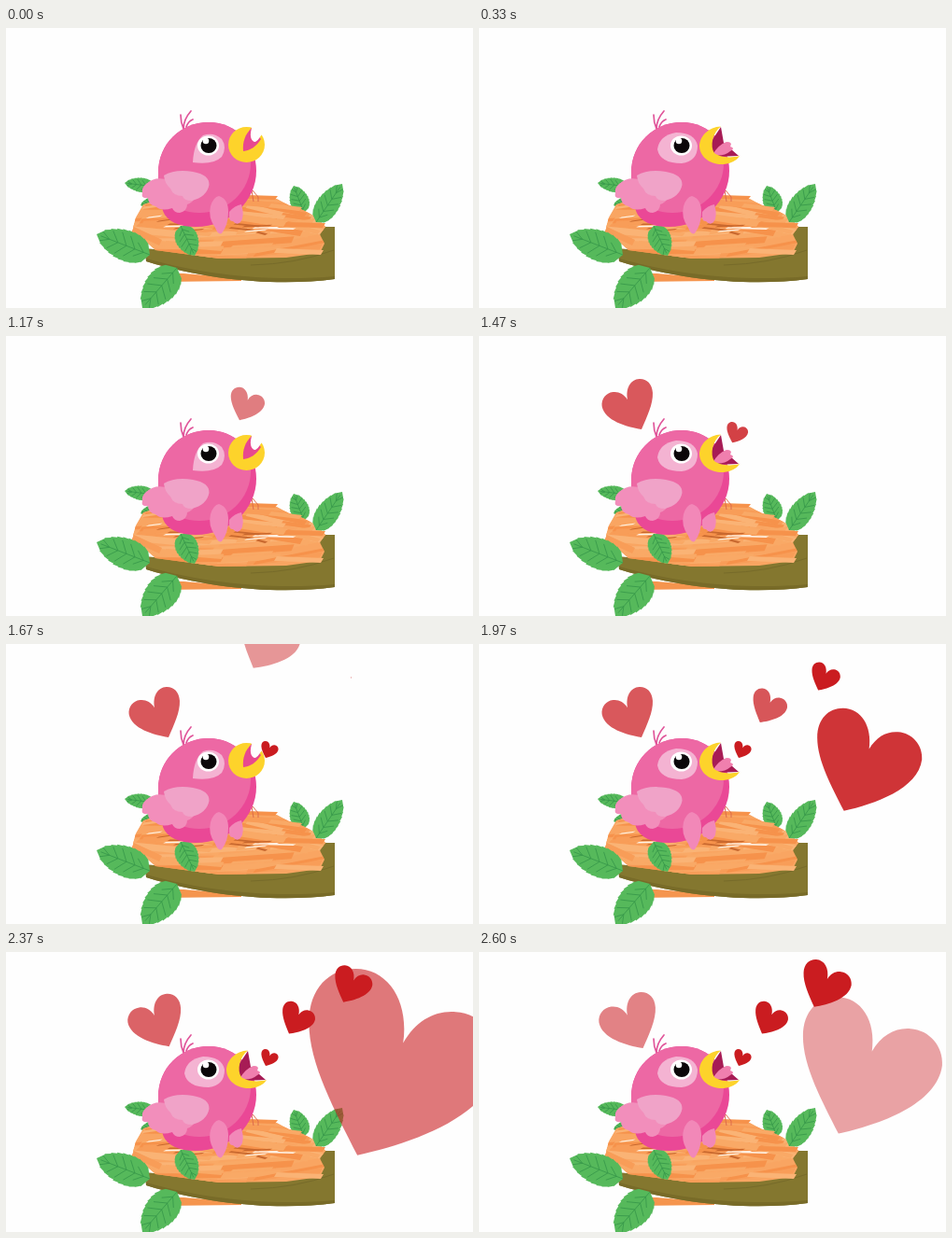
These frames come from a looping animation (500 px wide and 300 px high, 2.63 s). An HTML page:

```html
<!DOCTYPE html>
<html lang="en">
<head>
<meta charset="utf-8">
<title>Bird and hearts</title>
<style>
html, body { margin: 0; width: 100%; height: 100%; overflow: hidden; background: #fefefe; }
svg { display: block; width: 500px; height: 300px; }
</style>
</head>
<body>
<svg viewBox="0 0 500 300">
  <defs>
    <path id="heart" d="M0 0C-13-26-28-53-28-77C-28-97-16-108-1-108C18-108 30-89 26.5-65C34-78 45-84 57-83C72-82 83-69 82-54C78-23 32-7 0 0Z"/>
    <clipPath id="bodyClip"><path d="M217 101C246 101 268 124 268 153C268 185 240 213 203 213C185 213 172 207 168 196C165 182 163 170 163 155C163 124 187 101 217 101Z"/></clipPath>
    <clipPath id="nestClip"><path d="M136 214L139 203L147 189L162 184L262 182L290 183L303 190L318 195L333 203L342 213L336 221L341 231L336 241L300 246L228 247L160 238L150 229Z"/></clipPath>
  </defs>
  <g id="backLeaves"></g>
  <path fill="#f5954e" d="M155 262L190 263L252 268V271L165 272Z"/>
  <path fill="#84772f" d="M148 236C220 244 300 240 335 213H352V269C300 276 225 273 150 250Z"/>
  <path fill="#786b28" d="M150 247C225 268 295 271 352 266V269C300 276 225 273 150 250Z"/>
  <path fill="none" stroke="#776b2a" d="M262 254Q310 253 351 238"/>
  <g id="nest" clip-path="url(#nestClip)"></g>
  <g id="nestEnds"></g>
  <g id="frontLeaves"></g>

  <g fill="none" stroke="#e0559a" stroke-width="1.700" stroke-linecap="round">
    <path d="M190 108Q187 101 187 93M190 108Q190 98 198 89M193 106Q195 100 200 98"/>
  </g>
  <path fill="none" stroke="#dd6a4c" d="M262 168L265 186M264 174L270 181V186"/>
  <g clip-path="url(#bodyClip)">
    <path fill="#ea4896" d="M160 98H272V216H160Z"/>
    <ellipse cx="207" cy="145" rx="55" ry="53" fill="#ed68a4"/>
  </g>
  <path fill="#f28ebb" d="M150 167Q160 158 174 163L206 178Q199 188 194 189Q194 196 186 198Q180 198 178 193Q166 197 160 191Q152 189 152 182Q144 183 146 177Q145 171 150 167Z"/>
  <path fill="#f0a3c8" d="M169 158Q181 151 200 154Q218 157 217.500 168Q215 181 199 185Q190 185 189 180Q179 180 176 172Q170 167 169 158Z"/>
  <path fill="#f288b8" d="M228 180Q238 183 238 197Q238 211 231 220Q227 222 224 214Q216 203 219 191Q222 181 228 180Z"/>
  <path fill="#f288b8" d="M239 197Q245 190 252 189Q256 202 251 208Q247 212 243 207Q238 208 239 197Z"/>

  <g id="closed">
    <path fill="#f4b3d2" d="M200 144Q201 123 211 115Q222 111 231 119Q237 128 231 138Q222 147 200 144Z"/>
    <ellipse cx="257.500" cy="125" rx="19.500" ry="19" fill="#fdd32b"/>
    <path fill="#e8488f" d="M263 107C256 114 253 122 254 132C262 131 268 127 273 119Z"/>
    <path fill="#fefefe" d="M264 105C260 114 262 122 267 122C271 120 273 114 276 112L272 103Z"/>
  </g>
  <g id="open">
    <path fill="#f4b3d2" d="M191 130Q193 115 211 112Q231 112 234 126Q234 143 217 145Q194 145 191 130Z"/>
    <path fill="#a71c55" d="M259 106L262 123L278 137L252 138L247 124Z"/>
    <path fill="#f07fae" d="M250 136Q256 125 265 122Q272 122 269 127Q275 129 269 132Q262 138 250 136Z"/>
    <path fill="#fdd32b" d="M259 105.500C246 106 236 116 236 127C237 140 250 147 262 146C270 145 276 142 279 137C268 140 257 138 252 134C247 127 250 112 259 105.500Z"/>
  </g>
  <ellipse cx="216.500" cy="126" rx="11.500" ry="10.500" fill="#fff"/>
  <ellipse cx="217" cy="126" rx="8.500" ry="8" fill="#0b0709"/>
  <circle cx="214" cy="121" r="3.300" fill="#fff"/>
  <g id="hearts"></g>
</svg>
<script>
const LOOP = 2630, STEP = 100 / 3;
const $ = id => document.getElementById(id);

function add(parent, tag, attrs) {
  const node = document.createElementNS('http://www.w3.org/2000/svg', tag);
  for (const key in attrs) node.setAttribute(key, attrs[key]);
  return parent.appendChild(node);
}

// A serrated leaf from its base to its tip.
function leaf(parent, baseX, baseY, tipX, tipY, width) {
  const dx = tipX - baseX, dy = tipY - baseY, length = Math.hypot(dx, dy);
  const at = (u, v) => [baseX + dx * u - dy / length * v, baseY + dy * u + dx / length * v]
    .map(n => n.toFixed(1)).join(' ');
  const teeth = 10, left = [], right = [];
  for (let i = 0; i <= teeth; i++) {
    const u = i / teeth, half = width / 2 * Math.sin(Math.PI * u ** 0.8) ** 0.6;
    for (const [side, sign] of [[left, 1], [right, -1]]) {
      side.push(at(u, sign * half));
      if (i && i < teeth) side.push(at(u - 0.01, sign * half * 0.94));
    }
  }
  add(parent, 'path', { d: `M${left.join('L')}L${right.reverse().join('L')}Z`, fill: '#56b95b' });
  let veins = `M${at(0, 0)}L${at(0.92, 0)}`;
  for (let u = 0.12; u < 0.8; u += 0.16) {
    const v = width * 0.36 * Math.sin(Math.PI * (u + 0.1));
    veins += `M${at(u + 0.15, v)}L${at(u, 0)}L${at(u + 0.15, -v)}`;
  }
  add(parent, 'path', { d: veins, fill: 'none', stroke: '#35964a', 'stroke-width': 0.8 });
}

function straw(parent, x, y, length, tilt, thick, fill) {
  add(parent, 'path', { fill, d: `M${x} ${y}l${length} ${tilt}l-3 ${thick}l${-length} ${-tilt}Z` });
}

function buildNest() {
  let seed = 11;
  const random = () => (seed = seed * 16807 % 2147483647) / 2147483647;
  const nest = $('nest');
  const shades = ['#f9a966', '#f6924b', '#fab375', '#f9a966', '#f89d58'];
  add(nest, 'path', { d: 'M130 175H345V250H130Z', fill: '#f9a562' });
  for (let i = 0; i < 75; i++) {
    const x = 128 + random() * 165, y = 181 + random() * 62;
    const slope = (175 - x) / 430 * (y < 208 ? -0.8 : 0.8);
    const length = 35 + random() * 60;
    straw(nest, x, y, length, slope * length + random() * 8 - 4, 3 + random() * 4, shades[i % 5]);
  }
  for (let i = 0; i < 16; i++) {
    const x = 150 + random() * 150, y = 190 + random() * 30;
    straw(nest, x, y, 8 + random() * 22, random() * 6 - 3, 1.5, i % 3 ? '#c9692f' : '#fff3e6');
  }
  const ends = $('nestEnds');
  straw(ends, 258, 179, 33, 1, 4, '#f6924b');
  straw(ends, 284, 188, 33, 4, 4, '#f9a966');
  straw(ends, 137, 213, 30, 14, 6, '#f89d58');
  straw(ends, 300, 208, 42, 1, 5, '#f6924b');
  straw(ends, 290, 236, 50, 2, 5, '#fab375');
}

function bounce(p) {
  if (p <= 0) return 0;
  if (p >= 1) return 1;
  const k = 7.5625, q = p * 2.75;
  if (q < 1) return k * p * p;
  if (q < 2) return k * (p - 1.5 / 2.75) ** 2 + 0.75;
  if (q < 2.5) return k * (p - 2.25 / 2.75) ** 2 + 0.9375;
  return k * (p - 2.625 / 2.75) ** 2 + 0.984375;
}

// Each effect turns progress into a scale and an opacity.
const effects = {
  arrive: p => [1 + 4 * (1 - bounce(p)), Math.min(1, p)],
  grow: p => [bounce(p), 1],
  leave: p => [1 + 4 * (1 - bounce(1 - Math.max(0, p))), 1 - Math.max(0, p)]
};

const RED = '#ca1c20';
const hearts = [
  { effect: 'leave', show: 1833, start: 1830, time: 1300, tip: [391.9, 175.6], pivot: [408.5, 131], size: 0.95, turn: 0, fill: RED },
  { effect: 'leave', show: 1450, start: 2276, time: 1300, tip: [174, 100], pivot: [160, 73], size: 0.5, turn: 3, flip: true, fill: '#d9585c' },
  { effect: 'arrive', show: 547, start: 547, time: 1100, tip: [278, 122], pivot: [306.3, 154], size: 0.166, turn: 0, fill: RED },
  { effect: 'arrive', show: 1157, start: 1157, time: 1100, tip: [303, 87.5], pivot: [351, 165], size: 0.323, turn: 5, fill: RED },
  { effect: 'grow', show: 1600, start: 1600, time: 1330, tip: [358.5, 59.5], pivot: [369.5, 36], size: 0.485, turn: 3, fill: RED }
];

// Times at which the beak opens or shuts.
const beakTurns = [330, 970, 1300, 1630, 1930];

function render(t) {
  const isOpen = beakTurns.filter(turn => t >= turn).length % 2 === 1;
  $('open').style.display = isOpen ? '' : 'none';
  $('closed').style.display = isOpen ? 'none' : '';
  for (const h of hearts) {
    const [scale, opacity] = effects[h.effect]((t - h.start) / h.time);
    const [x, y] = h.tip.map((v, i) => h.pivot[i] + (v - h.pivot[i]) * scale);
    const s = h.size * scale;
    h.node.style.display = t >= h.show ? '' : 'none';
    h.node.setAttribute('opacity', opacity);
    h.node.setAttribute('transform', `translate(${x} ${y}) scale(${h.flip ? -s : s} ${s}) rotate(${h.turn})`);
  }
}

const back = $('backLeaves'), front = $('frontLeaves');
leaf(back, 159, 170, 127, 166, 16);
leaf(back, 162, 184, 144, 190, 10);
leaf(back, 319, 198, 308, 169, 21);
buildNest();
leaf(front, 332, 208, 360, 167, 25);
leaf(front, 154, 243, 97, 221, 34);
leaf(front, 183, 257, 146, 300, 36);
leaf(front, 187, 212, 202, 244, 25);
for (const h of hearts) h.node = add($('hearts'), 'use', { href: '#heart', fill: h.fill });

const begin = performance.now();
function tick() {
  const t = (performance.now() - begin) % LOOP;
  render(Math.floor((t + 4) / STEP) * STEP);
  requestAnimationFrame(tick);
}
tick();
</script>
</body>
</html>
```
